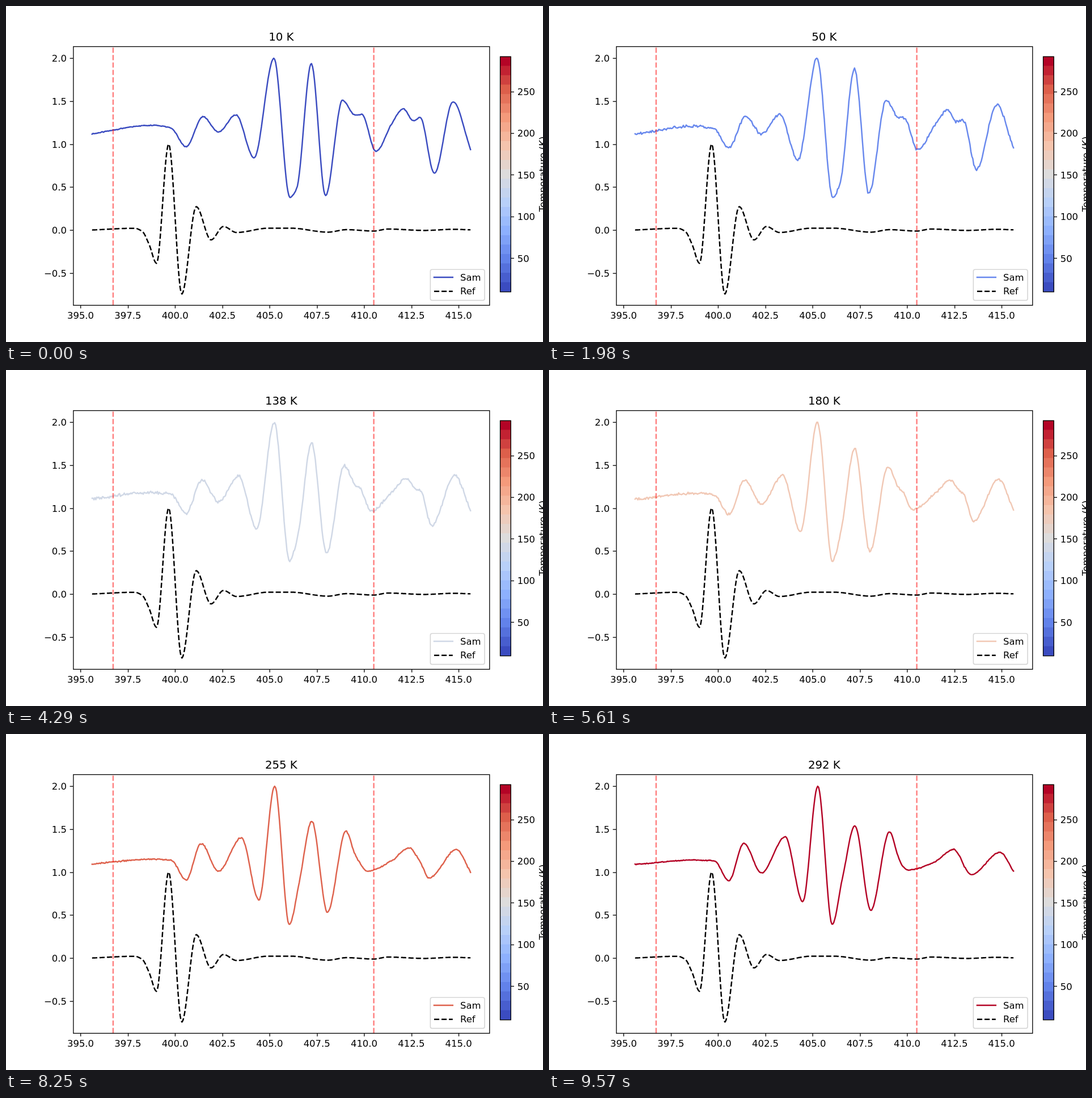
Write an HTML page with a canvas that moves like this. It is 947 px wide and 592 px high and loops after 9900 ms.

```html
<!DOCTYPE html>
<html lang="en">
<head>
<meta charset="utf-8">
<title>Temperature sweep</title>
<style>
  html, body { margin: 0; width: 100%; height: 100%; overflow: hidden; background: #fff; }
  canvas { display: block; }
</style>
</head>
<body>
<canvas id="stage" width="947" height="592"></canvas>
<script>
const ctx = document.getElementById('stage').getContext('2d');
const STEP = 330, STEPS = 30;
const COLDEST = 10, HOTTEST = 292;

// The figure is laid out on 960 x 600 and scaled to the stage
const WIDTH = 960, HEIGHT = 600, FONT = 16.67, TICK = 5.83, PAD = 11.67;
const AXES = { left: 120, top: 72, right: 864, bottom: 534 };
const BAR = { left: 883.2, top: 90, right: 902.4, bottom: 510 };
const DASH = [9.25, 4];
ctx.scale(947 / WIDTH, 592 / HEIGHT);

const lerp = (a, b, t) => a + (b - a) * t;
const snap = v => Math.floor(v + 0.5) + 0.5;
const px = time => 133.3 + (time - 395) * 33.79;
const py = level => 400 - level * 153.4;
const warmth = kelvin => (kelvin - COLDEST) / (HOTTEST - COLDEST);

// Finds the two stops around a value and blends what belongs to them
function between(stops, value, blend) {
  let i = 0;
  while (i < stops.length - 2 && value > stops[i + 1]) i++;
  return blend(i, i + 1, (value - stops[i]) / (stops[i + 1] - stops[i]));
}

const sweepSteps = [0, 6, 10, 17, 21, 29];
const sweepKelvin = [COLDEST, 50, 107, 180, 218, HOTTEST];
const kelvinAt = step => between(sweepSteps, step, (a, b, t) => lerp(sweepKelvin[a], sweepKelvin[b], t));

const coolwarm = [[59, 76, 192], [98, 130, 234], [141, 176, 254], [184, 208, 249], [221, 220, 220],
  [245, 196, 173], [244, 154, 123], [221, 95, 75], [180, 4, 38]];
function colorAt(warm) {
  const u = warm * 8, i = Math.min(7, Math.floor(u));
  return `rgb(${coolwarm[i].map((c, k) => Math.round(lerp(c, coolwarm[i + 1][k], u - i)))})`;
}

// Turning points of the sample curve: time and level when cold, then when hot
const turns = [
  [395.61, 1.12, 395.61, 1.09], [398.81, 1.22, 398.81, 1.14], [399.77, 1.19, 399.8, 1.13],
  [400.58, 0.97, 400.58, 0.9], [401.48, 1.32, 401.36, 1.335], [402.29, 1.14, 402.29, 0.99],
  [403.22, 1.34, 403.55, 1.41], [404.18, 0.84, 404.48, 0.655], [405.23, 2, 405.28, 2],
  [406.07, 0.38, 406.04, 0.39], [406.43, 0.48, 406.58, 0.93], [407.21, 1.935, 407.24, 1.54],
  [407.96, 0.4, 408.08, 0.555], [408.86, 1.51, 409.07, 1.47], [409.52, 1.34, 409.52, 1.19],
  [409.88, 1.345, 409.76, 1.07], [410.63, 0.915, 410.08, 1.025], [411.47, 1.24, 411.47, 1.12],
  [412.07, 1.41, 412.46, 1.265], [412.61, 1.27, 412.79, 1.18], [412.97, 1.31, 413.03, 1.065],
  [413.72, 0.66, 413.39, 0.97], [414.71, 1.495, 414.92, 1.23], [415.63, 0.94, 415.63, 1.01]
];
const sampleAt = warm => smoothCurve(turns.map(([time, level, hotTime, hotLevel]) =>
  [lerp(time, hotTime, warm), lerp(level, hotLevel, warm)]));

const reference = smoothCurve([
  [395.61, 0], [397.86, 0.02], [398.27, -0.018], [398.63, -0.17], [399.02, -0.388], [399.66, 1],
  [400.355, -0.745], [401.12, 0.272], [401.9, -0.115], [402.56, 0.041], [403.25, -0.029],
  [404.93, 0.021], [406.13, 0.021], [408.08, -0.025], [409.07, 0.004], [410.51, -0.012],
  [411.26, 0.011], [413.21, -0.005], [414.71, 0.008], [415.63, 0.002]
]);

// Monotone cubic through the points: flat at every peak and trough
function smoothCurve(points) {
  const xs = points.map(p => p[0]), ys = points.map(p => p[1]);
  const slope = xs.slice(1).map((x, i) => (ys[i + 1] - ys[i]) / (x - xs[i]));
  const tangent = xs.map((_, i) => {
    if (i === 0) return slope[0];
    if (i === slope.length) return slope[i - 1];
    const a = slope[i - 1], b = slope[i];
    return a * b > 0 ? 2 * a * b / (a + b) : 0;
  });
  return x => between(xs, x, (a, b, t) => {
    const w = xs[b] - xs[a], s = 1 - t;
    return ys[a] * s * s * (1 + 2 * t) + ys[b] * t * t * (3 - 2 * t)
      + w * t * s * (tangent[a] * s - tangent[b] * t);
  });
}
function random(seed) {
  const v = Math.sin(seed * 12.9898) * 43758.5453;
  return v - Math.floor(v);
}

function line(points, color, width = 1.33, dash = [], cap = 'butt') {
  ctx.beginPath();
  points.forEach(([x, y]) => ctx.lineTo(x, y));
  ctx.strokeStyle = color;
  ctx.lineWidth = width;
  ctx.setLineDash(dash);
  ctx.lineCap = cap;
  ctx.lineJoin = 'round';
  ctx.stroke();
  ctx.setLineDash([]);
}
function text(string, x, y, align = 'left', size = FONT) {
  ctx.font = `${size}px "DejaVu Sans", sans-serif`;
  ctx.textAlign = align;
  ctx.fillStyle = '#000';
  ctx.fillText(string, x, y);
}
function outline(box) {
  const x = snap(box.left), y = snap(box.top);
  ctx.strokeStyle = '#000';
  ctx.lineWidth = 1.33;
  ctx.lineJoin = 'miter';
  ctx.strokeRect(x, y, snap(box.right) - x, snap(box.bottom) - y);
}
function plot(curve, color, dash, cap, jitter = () => 0) {
  const count = 400;
  line(Array.from({ length: count + 1 }, (_, i) => {
    const time = lerp(395.61, 415.63, i / count);
    return [px(time), py(Math.min(2, curve(time) + jitter(i)))];
  }), color, 2.5, dash, cap);
}

function drawAxes() {
  for (let time = 395; time <= 415; time += 2.5) {
    const x = snap(px(time));
    line([[x, AXES.bottom], [x, AXES.bottom + TICK]], '#000');
    text(time.toFixed(1), px(time), AXES.bottom + 24.2, 'center');
  }
  for (let level = -0.5; level <= 2; level += 0.5) {
    const y = snap(py(level));
    line([[AXES.left - TICK, y], [AXES.left, y]], '#000');
    text(level.toFixed(1).replace('-', '\u2212'), AXES.left - PAD, py(level) + 6.3, 'right');
  }
  outline(AXES);
}

function drawColorBar() {
  const bands = 25, height = BAR.bottom - BAR.top;
  for (let i = 0; i < bands; i++) {
    const top = BAR.top + height * i / bands;
    ctx.fillStyle = colorAt(1 - i / (bands - 1));
    ctx.fillRect(BAR.left, top, BAR.right - BAR.left, BAR.bottom - top);
  }
  outline(BAR);
  for (let kelvin = 50; kelvin <= 250; kelvin += 50) {
    const y = lerp(BAR.bottom, BAR.top, warmth(kelvin));
    line([[BAR.right, snap(y)], [BAR.right + TICK, snap(y)]], '#000');
    text(kelvin, BAR.right + PAD, y + 6.3);
  }
  ctx.save();
  ctx.translate(965, HEIGHT / 2);
  ctx.rotate(-Math.PI / 2);
  text('Temperature (K)', 0, 0, 'center');
  ctx.restore();
}

function drawLegend(color) {
  ctx.beginPath();
  ctx.roundRect(758.6, 470.5, 97.05, 55.2, 3.3);
  ctx.fillStyle = 'rgba(255,255,255,.8)';
  ctx.fill();
  ctx.strokeStyle = 'rgba(204,204,204,.8)';
  ctx.lineWidth = 1.67;
  ctx.stroke();
  const entry = (label, y, ...style) => {
    line([[765.3, y], [798.6, y]], ...style);
    text(label, 812, y + 5.8);
  };
  entry('Sam', 484.5, color, 2.5, [], 'square');
  entry('Ref', 509.5, '#000', 2.5, DASH);
}

function draw(step) {
  const kelvin = kelvinAt(step), warm = warmth(kelvin), color = colorAt(warm);
  const noise = 0.006 + 0.016 * Math.sin(Math.PI * warm ** 0.6);
  const jitter = i => {
    const seed = i + step * 411;
    return noise * (random(seed) + random(seed + 0.5) - 1);
  };
  ctx.fillStyle = '#fff';
  ctx.fillRect(0, 0, WIDTH, HEIGHT);
  plot(sampleAt(warm), color, [], 'square', jitter);
  plot(reference, '#000', DASH, 'butt');
  for (const time of [396.7, 410.5]) {
    const x = snap(px(time));
    line([[x, AXES.bottom], [x, AXES.top]], 'rgba(255,0,0,.5)', 2.5, DASH);
  }
  drawAxes();
  drawLegend(color);
  drawColorBar();
  text(`${Math.round(kelvin)} K`, (AXES.left + AXES.right) / 2, AXES.top - 10, 'center', 20);
}

function tick() {
  draw(Math.floor(performance.now() / STEP) % STEPS);
  requestAnimationFrame(tick);
}
tick();
</script>
</body>
</html>
```
